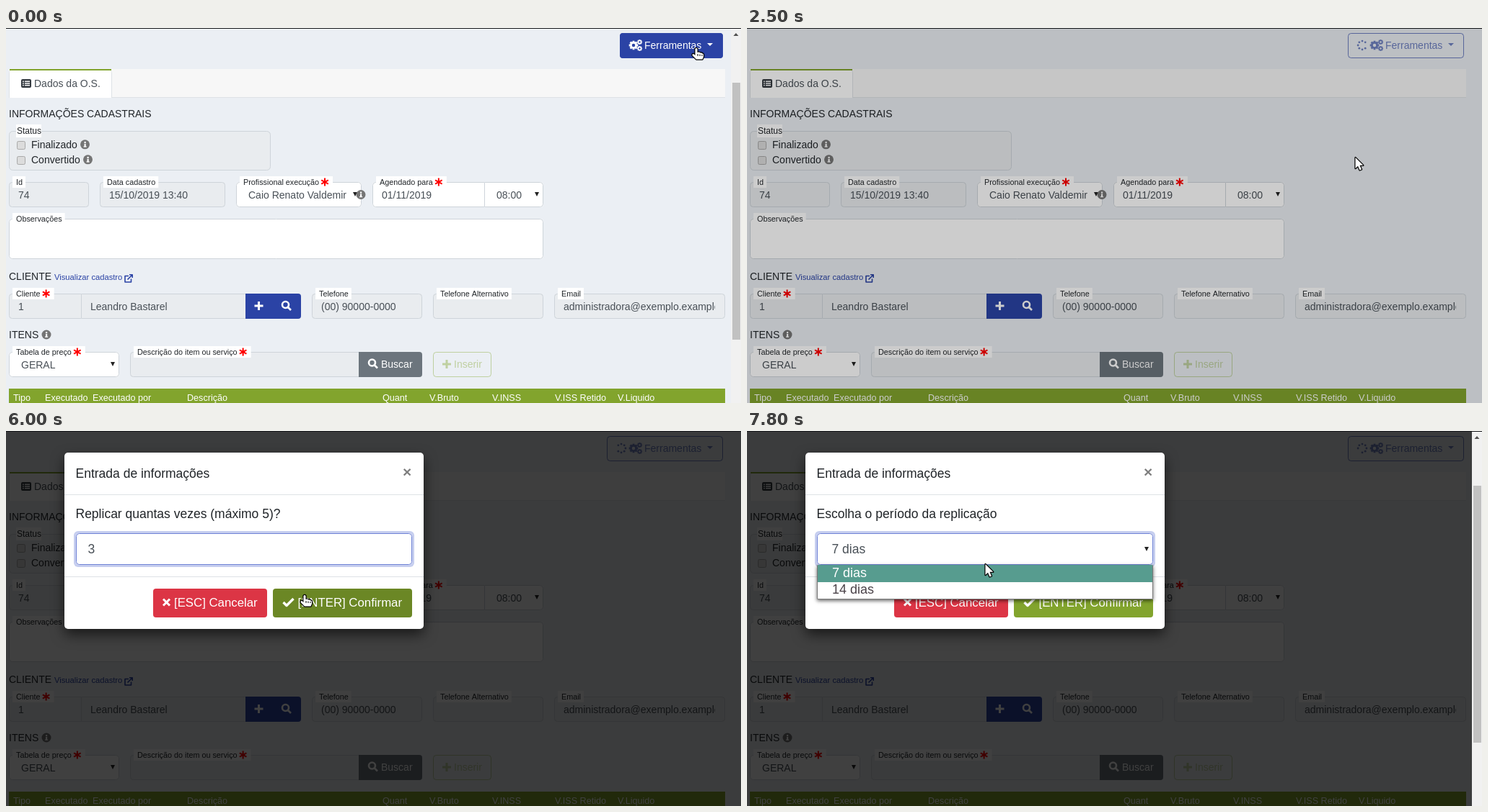
Recreate the animation shown at these times as an HTML page with a canvas. Size 1019 by 521 pixels, loop 8 s.

```html
<!DOCTYPE html>
<html lang="pt">
<head>
<meta charset="utf-8">
<title>Replicar O.S.</title>
<style>
html, body { margin: 0; width: 100%; height: 100%; overflow: hidden; }
canvas { display: block; }
</style>
</head>
<body>
<canvas id="stage" width="1019" height="521"></canvas>
<script>
const W = 1019, H = 521, LOOP = 8000;
const BLUE = '#2b43a5', GREEN = '#82a42d', RED = '#dc3545', PAGE = '#ebeff4';
const GREY = '#e9ecef', LINE = '#ced4da', INK = '#212529', FIELD_INK = '#495057';
const screen = document.getElementById('stage').getContext('2d');
const layerCanvas = document.createElement('canvas');
layerCanvas.width = W;
layerCanvas.height = H;
const layer = layerCanvas.getContext('2d');
let g = screen;

// Each entry adds its changes to the state before it.
const timeline = [
  [0, { cur: 'hand', x: 957, y: 28, button: 'plain', menu: false, hover: -1, bar: true, dim: 0,
        modal: null, alpha: 1, dx: 0, dy: 0, value: '1', focus: false, caret: false, hot: false, open: false }],
  [800, { menu: true, button: 'focus' }],
  [1200, { x: 930, y: 70, hover: 0 }],
  [1300, { x: 880, y: 138, hover: 2 }],
  [1400, { x: 845, y: 178, hover: 3 }],
  [2300, { menu: false, button: 'busy', cur: 'arrow', x: 843, y: 179 }],
  [2400, {}],
  [2500, { dim: 0.2, bar: false, button: 'outline' }],
  [2600, { dim: 0.55, modal: 'count', alpha: 0.33, dy: -37 }],
  [4300, { dim: 0.75, alpha: 1, dy: 0, value: '3', focus: true, caret: true, cur: 'beam', x: 408.5, y: 178 }],
  [4400, {}],
  [4600, {}],
  [4800, { caret: false }],
  [5000, {}],
  [5200, { x: 402.5, y: 174 }],
  [5800, { cur: 'hand', x: 414, y: 228, caret: true }],
  [6000, { hot: true, caret: false }],
  [6100, {}],
  [6200, {}],
  [6400, { dim: 0.69, alpha: 0.43, dy: -21 }],
  [6600, { dim: 0.66, modal: 'period', alpha: 0.65, dx: 7.5, dy: -26, focus: false, hot: false, cur: 'arrow' }],
  [6900, { dim: 0.75, alpha: 1, dx: 0, dy: 0, bar: true, hot: true }],
  [7100, {}],
  [7300, { x: 330, y: 184, hot: false }],
  [7500, {}],
  [7700, { focus: true }],
  [7800, { open: true }]
];

function stateAt(time) {
  const state = {};
  for (const [at, patch] of timeline) {
    if (at <= time) Object.assign(state, patch, { at });
  }
  return state;
}

function rect(x, y, w, h, fill) {
  g.fillStyle = fill;
  g.fillRect(x, y, w, h);
}

function box(x, y, w, h, fill, line, radius = 4) {
  g.beginPath();
  g.roundRect(x, y, w, h, radius);
  if (fill) { g.fillStyle = fill; g.fill(); }
  if (!line) return;
  g.beginPath();
  g.roundRect(x + 0.5, y + 0.5, w - 1, h - 1, radius);
  g.lineWidth = 1;
  g.strokeStyle = line;
  g.stroke();
}

function text(str, x, y, color = INK, size = 14, weight = '') {
  g.font = `${weight} ${size}px "Liberation Sans", Arial, sans-serif`;
  g.fillStyle = color;
  g.fillText(str, x, y);
  return g.measureText(str).width;
}

function disc(x, y, r, fill) {
  g.beginPath();
  g.arc(x, y, r, 0, 2 * Math.PI);
  g.fillStyle = fill;
  g.fill();
}

function shape(x, y, d, { fill, line, width = 1 }) {
  const path = new Path2D(d);
  g.save();
  g.translate(x, y);
  g.lineWidth = width;
  g.lineJoin = 'round';
  if (line) { g.strokeStyle = line; g.stroke(path); }
  if (fill) { g.fillStyle = fill; g.fill(path); }
  g.restore();
}

const plus = (x, y, color) => shape(x, y, 'M-6 0H6M0-6V6', { line: color, width: 3 });
const cross = (x, y, r, color) => shape(x, y, `M${-r} ${-r}L${r} ${r}M${r} ${-r}L${-r} ${r}`, { line: color, width: 3 });
const triangle = (x, y, color = '#222') => shape(x, y, 'M-3-3H3L0 3Z', { fill: color });

function magnifier(x, y) {
  shape(x, y, 'M3-1.5A4.5 4.5 0 1 1-6-1.5A4.5 4.5 0 1 1 3-1.5M2 2L6 6', { line: '#fff', width: 2.6 });
}

function info(x, y) {
  disc(x, y, 6.5, '#757575');
  rect(x - 1, y - 4, 2.2, 2.2, '#fff');
  rect(x - 1, y - 1, 2.2, 4.5, '#fff');
  rect(x - 2, y + 2.5, 4.2, 1.2, '#fff');
}

function asterisk(x, y) {
  shape(x, y, 'M0-5.5V5.5M-4.8-2.7L4.8 2.7M-4.8 2.7L4.8-2.7', { line: '#f00', width: 2 });
}

function gear(x, y, r, color) {
  g.strokeStyle = color;
  g.lineWidth = r * 0.45;
  g.beginPath();
  g.arc(x, y, r * 0.58, 0, 2 * Math.PI);
  for (let i = 0; i < 8; i++) {
    const c = Math.cos(i * Math.PI / 4), s = Math.sin(i * Math.PI / 4);
    g.moveTo(x + c * r * 0.7, y + s * r * 0.7);
    g.lineTo(x + c * r, y + s * r);
  }
  g.stroke();
}

function spinner(x, y, at, color) {
  const gap = ((Math.floor((at - 4400) / 125) % 8) + 8) % 8;
  for (let i = 0; i < 8; i++) {
    const a = i * Math.PI / 4;
    if (i !== gap) disc(x + 5.9 * Math.cos(a), y + 5.9 * Math.sin(a), 1.4, color);
  }
}

function label(str, x, y, required) {
  g.font = '10.8px "Liberation Sans", Arial, sans-serif';
  const w = g.measureText(str).width;
  rect(x - 5, y - 8, w + (required ? 24 : 9), 16, '#fff');
  text(str, x, y + 4, INK, 10.8);
  if (required) asterisk(x + w + 8, y);
}

function field(x, y, right, fill, value, valueX, radius = 4) {
  box(x, y, right - x, 35, fill, LINE, radius);
  g.save();
  g.beginPath();
  g.rect(x, y, right - x - 14, 35);
  g.clip();
  text(value, valueX, y + 23, FIELD_INK);
  g.restore();
}

function checkbox(y, str, infoX) {
  box(15, y, 12, 12, '#dcdcdc', '#a9a9a9', 2);
  text(str, 35, y + 10);
  info(infoX, y + 4.8);
}

function drawTools({ button, at }) {
  const busy = button === 'busy', outline = button === 'outline';
  const x = busy || outline ? 833 : 851, w = 994 - x;
  const ink = outline ? BLUE : '#fff';
  if (button === 'focus' || busy) box(x - 3, 4, w + 6, 41, 'rgba(72,95,190,.5)', null, 6);
  g.save();
  if (busy || outline) g.globalAlpha = 0.65;
  if (busy) box(x, 7, w, 35, PAGE);
  box(x, 7, w, 35, outline ? null : BLUE, BLUE);
  if (busy || outline) spinner(853, 24, at, ink);
  gear(870, 24, 6.3, ink);
  gear(878.5, 19.5, 3.6, ink);
  gear(878.5, 28.5, 3.6, ink);
  text('Ferramentas', 885, 29, ink);
  shape(976, 23, 'M-4-2H4L0 2Z', { fill: ink });
  g.restore();
}

function drawPage(state) {
  rect(0, 0, W, H, PAGE);
  drawTools(state);

  rect(4, 57, 993, 40, '#f7f7f7');
  rect(4, 96, 993, 1, '#dee2e6');
  box(4, 57, 143, 42, '#fff', '#dee2e6', [4, 4, 0, 0]);
  rect(4, 97, 144, 3, PAGE);
  rect(5, 57, 141, 2, GREEN);
  box(21, 71, 14, 12, '#343a40', null, 2);
  for (let y = 73.5; y < 81; y += 2.7) {
    rect(23, y, 1.7, 1.5, '#fff');
    rect(26, y, 7, 1.5, '#fff');
  }
  text('Dados da O.S.', 39, 82, FIELD_INK);

  text('INFORMAÇÕES CADASTRAIS', 4, 124);
  box(4, 143, 363, 55, GREY, LINE, 5);
  rect(14, 134, 35, 18, '#fff');
  text('Status', 15, 147, INK, 12);
  checkbox(157, 'Finalizado', 109.5);
  checkbox(178, 'Convertido', 113.5);

  field(4, 214, 115, GREY, '74', 17);
  label('Id', 14, 214);
  field(130, 214, 304, GREY, '15/10/2019 13:40', 143);
  label('Data cadastro', 140, 214);
  field(319, 214, 493, '#fff', 'Caio Renato Valdemir', 336);
  label('Profissional execução', 329, 214, true);
  triangle(484, 231);
  info(492, 231.5);
  field(508, 214, 664, '#fff', '01/11/2019', 521, [4, 0, 0, 4]);
  field(663, 214, 745, '#fff', '08:00', 680, [0, 4, 4, 0]);
  label('Agendado para', 518, 214, true);
  triangle(736, 231);
  box(4, 265, 741, 56, '#fff', LINE);
  label('Observações', 14, 265);

  text('CLIENTE', 4, 350);
  text('Visualizar cadastro', 67, 350, BLUE, 11.2);
  shape(164, 342, 'M6 2.5H1V11H9.5V6.5M4.5 7.5L11 1M7 .8H11.2V5', { line: BLUE, width: 1.6 });
  field(4, 369, 106, GREY, '1', 17, [4, 0, 0, 4]);
  field(104, 369, 333, GREY, 'Leandro Bastarel', 117, 0);
  label('Cliente', 14, 369, true);
  box(332, 369, 77, 35, BLUE, null, [0, 4, 4, 0]);
  plus(350.5, 386, '#fff');
  magnifier(389, 386);
  field(424, 369, 577, GREY, '(00) 90000-0000', 437);
  label('Telefone', 434, 369);
  field(592, 369, 745, GREY, '', 605);
  label('Telefone Alternativo', 602, 369);
  field(760, 369, 997, GREY, 'administradora@exemplo.example', 773);
  label('Email', 770, 369);

  text('ITENS', 4, 431);
  info(56, 426);
  field(4, 450, 157, '#fff', 'GERAL', 21);
  label('Tabela de preço', 14, 450, true);
  triangle(148, 467);
  field(172, 450, 490, GREY, '', 185, [4, 0, 0, 4]);
  label('Descrição do item ou serviço', 182, 450, true);
  box(489, 450, 88, 35, '#6c757d', null, [0, 4, 4, 0]);
  magnifier(509, 466.5);
  text('Buscar', 520, 472, '#fff');
  g.save();
  g.globalAlpha = 0.42;
  box(592, 450, 81, 35, null, GREEN);
  plus(611, 467, GREEN);
  text('Inserir', 621, 472, GREEN);
  g.restore();

  rect(4, 501, 993, 20, GREEN);
  const heads = { 'Tipo': 10, 'Executado': 54, 'Executado por': 120, 'Descrição': 251, 'Quant': 522,
                  'V.Bruto': 587, 'V.INSS': 674, 'V.ISS Retido': 761, 'V.Liquido': 848 };
  for (const name in heads) text(name, heads[name], 518, '#fff', 12.6);
}

function drawScrollbar() {
  rect(1005, 0, 14, H, '#f1f1f1');
  rect(1007, 76, 11, 357, '#c1c1c1');
  shape(1012, 9, 'M-3.5 2H3.5L0-2Z', { fill: '#505050' });
}

const icons = {
  columns: (x, y, c) => {
    shape(x, y, 'M-6-5H6V5H-6ZM0-4V5', { line: c, width: 2 });
    rect(x - 7, y - 6, 14, 4, c);
  },
  bolt: (x, y, c) => shape(x, y, 'M-3-7H2L1-2H5L-2 7L-.5 1H-4.5Z', { fill: c }),
  copy: (x, y, c) => {
    shape(x, y, 'M-6-4H-3V5H3V7H-6Z', { fill: c });
    shape(x, y, 'M-2-7H3V-4H6V4H-2Z', { fill: c });
  },
  clone: (x, y, c) => {
    box(x - 3, y - 7, 10, 10, c, null, 1.5);
    shape(x, y, 'M-7-3H-4V4H3V7H-7Z', { fill: c });
  },
  print: (x, y, c) => {
    shape(x, y, 'M-4 0V-6H3L4.5-4.5V0M-4 2.5H4V6H-4Z', { line: c, width: 2 });
    shape(x, y, 'M-7 0L-5-1.5H5L7 0V4.5H4.5V2H-4.5V4.5H-7Z', { fill: c });
  },
  times: (x, y, c) => cross(x, y, 3.7, c)
};

const menuItems = [
  ['columns', 754, 'Converter O.S. em Pedido', 770, 67],
  ['bolt', 752, 'Marcar O.S. como finalizada', 765, 96],
  ['copy', 753, 'Clonar O.S. (Uma cópia)', 768.5, 142],
  ['clone', 754, 'Replicar O.S. (Periodicamente)', 770, 171],
  ['print', 754, 'Formato de Expedição Simples', 770, 217],
  ['print', 754, 'Formato de Proposta Comercial', 770, 246, '#6c757d'],
  ['times', 752, 'Cancelar O.S.', 766, 292]
];

function withShadow(blur, offset, color, draw) {
  g.save();
  g.shadowBlur = blur;
  g.shadowOffsetY = offset;
  g.shadowColor = color;
  draw();
  g.restore();
}

function drawMenu(hover) {
  withShadow(12, 6, 'rgba(0,0,0,.2)', () => box(723, 44, 271, 272, '#fff'));
  box(723, 44, 271, 272, null, 'rgba(0,0,0,.25)');
  for (const y of [119, 194, 269]) rect(724, y, 269, 1, '#e9ecef');
  menuItems.forEach(([icon, iconX, str, x, y, color = INK], i) => {
    if (i === hover) rect(724, y - 14, 269, 29, '#dddddd');
    icons[icon](iconX, y, color);
    text(str, x, y + 5, color);
  });
}

function drawModal({ modal, value, focus, caret, hot, open }) {
  const period = modal === 'period';
  withShadow(18, 8, 'rgba(0,0,0,.6)', () => box(81, 30, 498, 245, '#fff', null, 5));
  rect(81, 88, 498, 1, '#dee2e6');
  rect(81, 202, 498, 1, '#dee2e6');
  text('Entrada de informações', 96.5, 65, INK, 17.5);
  text('×', 550, 64, '#7f7f7f', 21, 'bold');
  text(period ? 'Escolha o período da replicação' : 'Replicar quantas vezes (máximo 5)?', 96.5, 121, INK, 17.5);

  if (focus) box(94, 139, 472, 50, '#c6ceef', null, 6);
  box(97, 142, 466, 44, '#fff', focus ? '#6f82d6' : period ? '#9aa0a6' : LINE);
  text(period ? '7 dias' : value, period ? 117.5 : 113.5, 170, FIELD_INK, 17.5);
  if (period) triangle(554, 164);
  if (caret) rect(124, 154, 1, 20, '#222');

  box(204, 219, 158, 40, RED);
  cross(222.5, 238, 4.5, '#fff');
  text('[ESC] Cancelar', 233, 244, '#fff', 16.8);
  box(370, 219, 193, 40, hot ? '#6b8725' : GREEN);
  shape(391.5, 238, 'M-7 0L-2.5 4.5L7-5', { line: '#fff', width: 3.4 });
  text('[ENTER] Confirmar', 404.5, 244, '#fff', 16.8);

  if (open) {
    withShadow(5, 2, 'rgba(0,0,0,.6)', () => rect(97, 186, 466, 48, '#fff'));
    box(97, 186, 466, 48, '#fff', '#777', 0);
    rect(98, 186, 464, 24, '#579c8f');
    text('7 dias', 118, 203, '#fff', 18);
    text('14 dias', 118, 226, '#4a4248', 18);
  }
}

function drawCursor({ cur, x, y }) {
  const style = { fill: '#fff', line: '#000', width: 2.4 };
  if (cur === 'hand') {
    shape(x, y, 'M-1.5 9V1Q0-1 1.5 1V6Q5 5 5 6.5Q8 6 8 7.5Q10 7 10 9V12L8.5 15.5H0L-5.5 10Q-5.5 7-3 8.5L-1.5 10Z', style);
    shape(x, y, 'M2 8V11M5 8.5V11M8 9V11', { line: '#000' });
  } else if (cur === 'arrow') {
    shape(x, y, 'M.5 1V16L4 12.8L6.5 18.5L9 17.5L6.5 11.8H11.3Z', style);
  } else {
    const beam = 'M-4-7.5H-1Q0-7.5 0-6.5Q0-7.5 1-7.5H4M0-7V7M-4 7.5H-1Q0 7.5 0 6.5Q0 7.5 1 7.5H4';
    shape(x, y, beam, { line: '#fff', width: 3.5 });
    shape(x, y, beam, { line: '#000', width: 1.7 });
  }
}

function render(state) {
  g = screen;
  drawPage(state);
  if (state.menu) drawMenu(state.hover);
  if (state.dim) rect(0, 0, W, H, `rgba(0,0,0,${state.dim})`);
  if (state.modal) {
    g = layer;
    g.clearRect(0, 0, W, H);
    drawModal(state);
    g = screen;
    g.globalAlpha = state.alpha;
    g.drawImage(layerCanvas, state.dx, state.dy);
    g.globalAlpha = 1;
  }
  if (state.bar) drawScrollbar();
  rect(0, 0, W, 1, '#15171a');
  drawCursor(state);
}

let shown = -1;
function tick() {
  const state = stateAt(performance.now() % LOOP);
  if (state.at !== shown) {
    shown = state.at;
    render(state);
  }
  requestAnimationFrame(tick);
}
tick();
</script>
</body>
</html>
```
